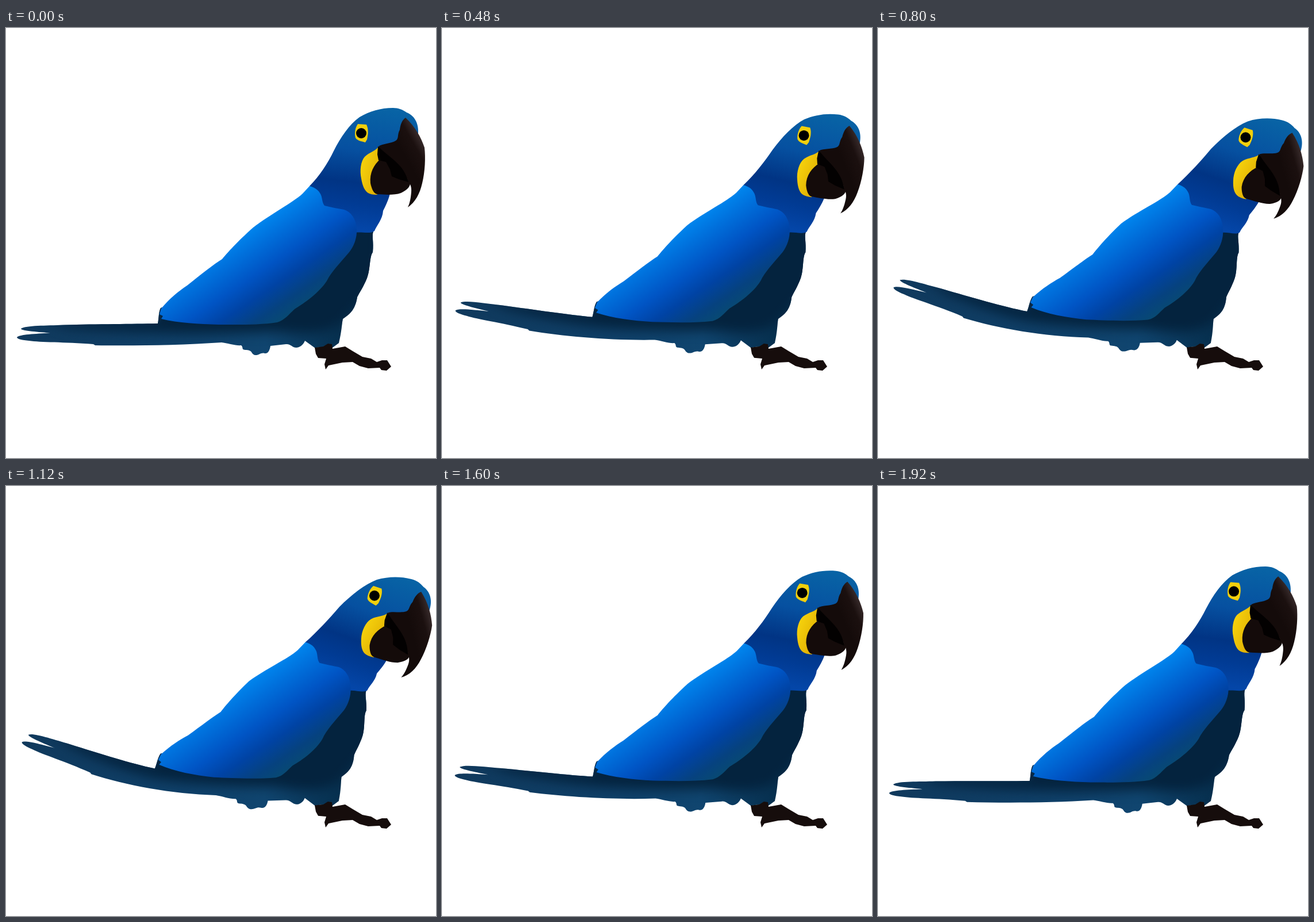
An HTML page with a canvas that plays this animation: 748 px wide and 748 px high, repeating every 1960 ms.

```html
<!DOCTYPE html>
<html lang="en">
<head>
<meta charset="utf-8">
<title>Parrot</title>
<style>
html, body { margin: 0; width: 100%; height: 100%; overflow: hidden; background: #fff }
canvas { display: block }
</style>
</head>
<body>
<canvas id="stage" width="748" height="748"></canvas>
<script>
const ctx = document.getElementById('stage').getContext('2d');
const LOOP = 1960, STEP = 40, HALF = 1000;

const body = `M19,538 C24,533 50,532 77,530.5 C60,529 26,527 26,523 C35,517 70,518 100,516.5
  C160,515 220,515 264,514 C266,505 265,495 269,487 L290,480 L530,330 L610,355 L639,354
  C636,362 640,372 638,390 C632,398 634,420 628,435 C622,450 615,460 611,468
  C608,488 600,497 586,506 C584,515 584,528 579,548 L568,556 C555,556 548,553 538,557
  L520,544 C517,552 510,556 505,556 C498,556 495,549 487,550 L460,553
  C459,560 456,567 450,566 C443,564 440,570 433,569 C425,566 430,561 418,560
  C408,560 414,556 409,552 C400,553 385,548 375,547 C300,552 220,553 155,552
  L152,550 C100,546 60,547 40,544 C28,543 19,541 19,538 Z`;
const shade = `M60,508 L264,505 L264,480 L530,300 L650,330 L650,440 L592,505
  C560,540 500,530 470,528 C400,532 300,532 260,530 C200,529 160,526 110,522 Z`;
const head = `M528,275 C545,258 560,235 570,214 C582,190 597,168 615,155
  C632,145 652,139 673,139 C683,139 690,142 697,147 C710,152 718,165 717,183
  L700,240 L668,288 C665,300 660,310 656,318 C655,333 645,343 641,353
  C634,359 618,354 608,356 L580,330 L535,300 Z`;
const wing = `M528,275 C535,277 542,280 546,287 C551,294 549,303 554,309
  C565,312 578,314 588,316 C600,320 609,331 610,350 C611,365 605,380 597,390
  C580,410 566,424 558,440 C545,460 520,478 502,489 C492,498 485,508 472,512
  C440,517 400,516 370,516 C335,515 300,513 270,506 L273,501 L267,498 L270,488
  C285,470 300,458 315,448 C340,428 360,412 376,402 C385,391 402,372 430,347
  C460,324 500,303 516,288 Z`;
const eye = `M612,167 L627,168 C631,176 630,185 628,194 L625,199
  C618,197 611,196 608,191 C606,184 607,174 612,167 Z`;
const cheek = `M648,206 C645,213 632,216 624,224 C617,232 615,248 618,262
  C620,274 624,285 632,288 C637,290 642,290 646,290 L640,265 L655,231 L648,220 L652,210 Z`;
const jaw = `M651,228 C640,238 632,252 634,270 C636,280 640,288 645,289
  C660,290 676,291 687,287 C699,281 704,275 703,268 L672,232 Z`;
const mouth = `M647,206 L690,225 L700,268 L683,263 L671,258 L668,246 L661,233 L648,230 L646,220 Z`;
const beak = `M695,156 C689,160 686,168 685,177 C680,186 684,192 678,196
  C670,201 655,201 648,206 C662,222 690,235 698,262 C702,270 706,275 705,285
  C704,298 702,305 699,312 C712,303 720,288 724,270 C729,250 730,225 728,208
  C722,190 712,172 695,156 Z`;
const foot = `M537,556 L552,554 L560,549 L567,550 L568,558 L590,554 L603,562 L620,572
  L635,575 L645,581 L654,578 L663,578 L670,589 L662,596 L653,595 L650,591 L630,592
  L615,588 L603,581 L585,582 L561,587 L556,594 L554,585 L557,575 L543,574 L539,567 Z`;

let bend = 0;

const ramp = (v, from, to) => Math.min(1, Math.max(0, (v - from) / (to - from)));
const smooth = (v, from, to) => { const u = ramp(v, from, to); return u * u * (3 - 2 * u); };

// Tail curls up, torso leans back, head turns about the neck
function warp(x, y) {
  const u = ramp(x, 460, 130), far = Math.max(0, 130 - x);
  const angle = .31 * smooth(x, 460, 130);
  const rise = .31 * (330 * (u ** 3 - u ** 4 / 2) + far);
  const shrink = .048 * (330 * .371 * u ** 4 + far);
  const lean = 9 * Math.max(smooth(y, 560, 400), smooth(x, 500, 420)) * smooth(x, 60, 260);
  const dx = shrink + angle * (530 - y) - lean;
  const dy = -rise - 7.5 * smooth(x, 560, 410);

  const w = smooth((x - 528) * .7 - (y - 275) * .71, -40, 130);
  const hx = x - 599, hy = y - 277;
  const turnX = -.032 * hx - .252 * hy, turnY = .252 * hx - .032 * hy;
  return [x + bend * (dx + (turnX - dx) * w), y + bend * (dy + (turnY - dy) * w)];
}

const shape = d => new Path2D(d.replace(/([\d.]+),([\d.]+)/g, (_, x, y) => warp(+x, +y).join()));

function gradient(x1, y1, x2, y2, ...stops) {
  const g = ctx.createLinearGradient(...warp(x1, y1), ...warp(x2, y2));
  stops.forEach(([at, color]) => g.addColorStop(at, color));
  return g;
}

function fill(d, style) {
  ctx.fillStyle = style;
  ctx.fill(shape(d));
}

function drawBody() {
  fill(body, gradient(20, 540, 580, 540,
    [0, '#10395c'], [.55, '#0f4069'], [.77, '#10456f'], [1, '#07304f']));
  ctx.save();
  ctx.clip(shape(body));
  ctx.filter = 'blur(10px)';
  fill(shade, '#04233e');
  ctx.restore();
}

function draw(time) {
  const t = Math.floor(time % LOOP / STEP) * STEP;
  const u = t < HALF ? t / HALF : 2 - t / HALF;
  bend = (u - Math.sin(2 * Math.PI * u) / (4 * Math.PI)) / .94;

  ctx.fillStyle = '#fff';
  ctx.fillRect(0, 0, 748, 748);
  drawBody();
  fill(foot, '#160d0c');
  fill(head, gradient(640, 140, 615, 350,
    [0, '#0863a5'], [.35, '#0650a0'], [.62, '#013484'], [.8, '#013b94'], [1, '#0446a8']));
  fill(wing, gradient(415, 350, 510, 490,
    [0, '#0088f0'], [.2, '#0070dc'], [.45, '#0054c4'], [.65, '#0043a4'], [.85, '#06427f'], [1, '#084a72']));
  fill(eye, '#f2cf0c');
  ctx.fillStyle = '#000';
  ctx.beginPath();
  ctx.arc(...warp(618, 183), 9, 0, 2 * Math.PI);
  ctx.fill();
  fill(cheek, gradient(618, 240, 650, 250, [0, '#f5d00c'], [1, '#e3b404']));
  fill(jaw, '#140b0a');
  fill(mouth, '#030101');
  fill(beak, gradient(695, 225, 730, 205, [0, '#140b0a'], [.6, '#1b100f'], [1, '#382b2b']));
}

const start = performance.now();
function tick() {
  draw(performance.now() - start);
  requestAnimationFrame(tick);
}
tick();
</script>
</body>
</html>
```
